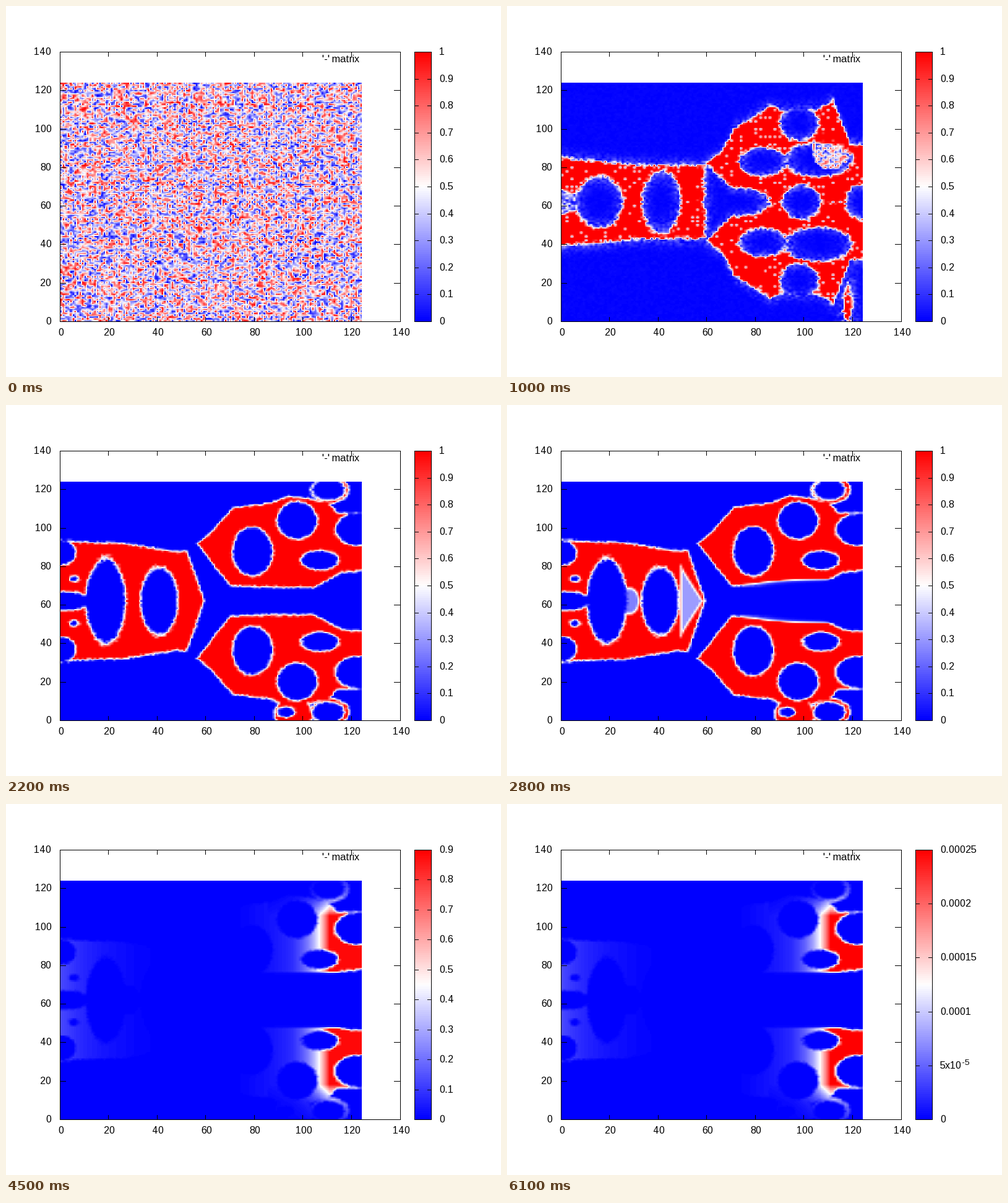
These frames come from a looping animation (800 by 600 pixels, 6200 ms). A matplotlib script:

```python
import math

import matplotlib.pyplot as plt
import numpy as np
from matplotlib.animation import FuncAnimation
from matplotlib.colors import LinearSegmentedColormap

plt.rcParams.update({"font.family": "Liberation Sans", "text.hinting_factor": 1})
FRAMES, INTERVAL = 62, 100
NODES = 125
PX = 0.72          # one pixel in points at 100 dpi
FONT = 16 * PX
DECAY = 0.6        # density ratio of thinning material per frame
FADE_END = 44.75   # time at which the last material starts to thin

rng = np.random.default_rng(7)
X, Y = np.meshgrid(np.arange(NODES), np.arange(NODES))
V = np.abs(Y - 62)  # the structure mirrors about its middle line
noise = rng.random((NODES, NODES))
grain = rng.random((NODES, NODES))
dots = (grain > 0.8) & (X % 2 == 0) & (Y % 2 == 0)


# ---- shapes as distances, positive inside ----
def oval(cx, cy, rx, ry, y=V):
    return (1 - np.hypot((X - cx) / rx, (y - cy) / ry)) * min(rx, ry)


def curve(*pts):
    return np.interp(X, *zip(*pts))


def join(*shapes):
    return np.maximum.reduce(shapes)


def meet(*shapes):
    return np.minimum.reduce(shapes)


def cut(shape, *holes):
    return np.minimum(shape, -join(*holes))


def frame_of(outer, inner, edge):
    """Left body up to edge, and an arm between the inner and outer curves."""
    below = 0.8 * (outer - V)
    return join(meet(below, edge - X), meet(below, 0.8 * (V - inner)))


def young_shape():
    outer = curve((0, 23), (33, 19), (58, 19), (66, 26), (71, 38), (86, 50),
                  (92, 47), (106, 48), (112, 53), (119, 30))
    inner = curve((56, 60), (59, 21), (69, 9), (72, 0))
    solid = cut(frame_of(outer, inner, 59),
                oval(15.5, 0, 9.5, 13.5), oval(0, 0, 7, 6), oval(41, 0, 8, 16.5),
                oval(72, 0, 14, 7.5), oval(83, 21, 10, 7.5), oval(106, 22, 14, 9),
                oval(98, 41, 8, 9), oval(99, 0, 8, 9), oval(124, 0, 7, 9))
    return join(solid, oval(118, 8, 1.8, 9, Y))


def grown_shape():
    outer = curve((0, 32), (7, 31), (25, 30.5), (48, 26), (53, 27), (62, 36),
                  (71, 49), (86, 51), (94, 55), (110, 52), (114, 46))
    inner = curve((50, 42), (56, 30), (70, 8), (104, 7), (116, 15), (124, 16))
    solid = cut(frame_of(outer, inner, 59 - 0.27 * V),
                oval(18.5, 0, 8.2, 22.5), oval(2, 0, 10, 5), oval(0, 25, 6, 6.5),
                oval(5.3, 11.5, 2.2, 1.7), oval(40.5, 0, 7.7, 18),
                oval(79, 26, 8.5, 13), oval(97.5, 42, 8.3, 9.8),
                oval(107, 21.3, 7.5, 5), oval(123, 37.2, 10, 8.5))
    ring = cut(oval(111, 58, 8, 7), oval(110.5, 58, 6.5, 5.5))
    return join(solid, ring, cut(oval(96, 3, 8, 9, Y), oval(93, 4, 3.5, 2.5, Y),
                                 oval(97.5, 20, 8.3, 9.8, Y)))


def fall_times():
    """Time at which each place starts to thin: the free middle goes first."""
    t = curve((0, 41), (26, 37.6), (38, 35), (47, 31), (58, 29.5), (80, 37.4),
              (95, 40), (111, FADE_END))
    t = t - 0.1 * np.maximum(0, 15 - V) * np.maximum(0, X - 62)
    t = t - 0.25 * np.maximum(0, V - 44) * (X > 85)
    disc = oval(28, 0, 4.5, 8)
    wedge = meet(X - 48, 59 - 0.5 * V - X)
    t = np.where(disc > 0, 28.3 - 2 * np.minimum(disc, 1.5), t)
    return np.where(wedge > 0, 28.3 - 1.3 * np.minimum(wedge, 2), t)


young, grown = (np.clip(s, -6, 6) for s in (young_shape(), grown_shape()))
fall = fall_times()
haze = join(0.9 * (oval(111, 89, 8, 10, Y) > 0), 0.6 * (oval(1, 0, 5, 6) > 0))


def density(n):
    u = np.clip((n - 10) / 15, 0, 1)
    g = young + (grown - young) * (1 - (1 - u) ** 2)
    rough = np.clip((20 - n) / 10, 0, 1)
    g = g + (0.6 + 0.8 * rough) * (noise - 0.5)
    rho = np.clip(0.5 + g / 1.2, 0, 1)
    if rough:
        rho = rho - 0.6 * rough * dots * (g > 0.5)
        fuzz = 0.35 * np.exp(np.minimum(g, 0) / 2)
        rho = np.maximum(rho, rough * grain * np.maximum(fuzz, haze))
    if n < 10:
        start = np.clip(noise + 0.2 * n * np.tanh(young / 4), 0, 1)
        rho = start + (rho - start) * np.clip((n - 3) / 7, 0, 1)
    if n > 23:
        rho = rho * np.minimum(1, DECAY ** (n - fall))
    return rho


# linear interpolation from nodes to two cells per step
cells = np.arange(2 * NODES - 1) / 2
spread = np.maximum(0, 1 - np.abs(cells[:, None] - np.arange(NODES)))


# ---- stage, in pixels from the top left ----
fig = plt.figure(figsize=(8, 6), dpi=100, facecolor="white")
ax = fig.add_axes([0, 0, 1, 1])
ax.axis("off")
cmap = LinearSegmentedColormap.from_list("ramp", ["#0000ff", "#ffffff", "#ff0000"], N=128)


def picture(data, extent):
    return ax.imshow(data, cmap=cmap, vmin=0, vmax=1, origin="lower",
                     extent=extent, aspect="auto", interpolation="nearest")


def rule(xs, ys):
    return ax.plot(xs, ys, color="black", lw=PX, antialiased=False, snap=False,
                   solid_capstyle="butt", solid_joinstyle="miter", zorder=3)[0]


def label(x, y, text, ha="left", size=FONT):
    return ax.text(x, y, text, ha=ha, va="baseline", fontsize=size, zorder=4)


def box(x0, y0, x1, y1):
    rule([x0, x1, x1, x0, x0, x1], [y0, y0, y1, y1, y0, y0])


def bar_row(share):
    return round(510 - 436 * share) + 0.5


image = picture(np.zeros((2, 2)), (88, 575, 510, 124))
picture(np.linspace(0, 1, 128)[:, None], (660, 688, 510, 74))
ax.set_xlim(0, 800)
ax.set_ylim(600, 0)

box(87.5, 74.5, 637.5, 510.5)
box(660.5, 74.5, 687.5, 510.5)
for k in range(8):
    x, y = 87 + 550 * k / 7, bar_row(k / 7)
    column = math.floor(x) + 0.5
    rule([column] * 2, [503, 511])
    rule([column] * 2, [74, 82])
    rule([87, 97], [y, y])
    rule([627, 637], [y, y])
    label(x + 1.5, 533, str(20 * k), "center")
    label(73.5, y + 4.5, str(20 * k), "right")
label(571, 91, "'-' matrix", "right")

MAX_TICKS = 21
bar_ticks = [(rule([660, 667], [0, 0]), rule([681, 688], [0, 0]),
              label(700, 0, ""), label(735, 0, "", size=FONT * 0.8))
             for _ in range(MAX_TICKS)]


def tick_step(span):
    power = 10.0 ** math.floor(math.log10(span))
    room = 20 * power / span
    for limit, step in ((40, 0.05), (20, 0.1), (10, 0.2), (4, 0.5)):
        if room > limit:
            return step * power
    return power


def set_scale(peak):
    step = tick_step(peak)
    count = math.ceil(peak / step - 1e-9)
    for i, parts in enumerate(bar_ticks):
        for part in parts:
            part.set_visible(i <= count)
        if i > count:
            continue
        y = bar_row(i / count)
        left, right, text, power = parts
        left.set_ydata([y, y])
        right.set_ydata([y, y])
        base, _, exponent = f"{i * step:.6g}".partition("e")
        text.set_text(base + "x10" if exponent else base)
        power.set_text(str(int(exponent)) if exponent else "")
        text.set_y(y + 4.5)
        power.set_y(y - 1.5)
    image.set_clim(0, count * step)


def draw(n):
    image.set_data(spread @ density(n) @ spread.T)
    set_scale(min(0.9999, DECAY ** (n - FADE_END)))
    return [image]


anim = FuncAnimation(fig, draw, frames=FRAMES, interval=INTERVAL,
                     init_func=lambda: draw(0), repeat=True, repeat_delay=0,
                     blit=False)
plt.show()
```
